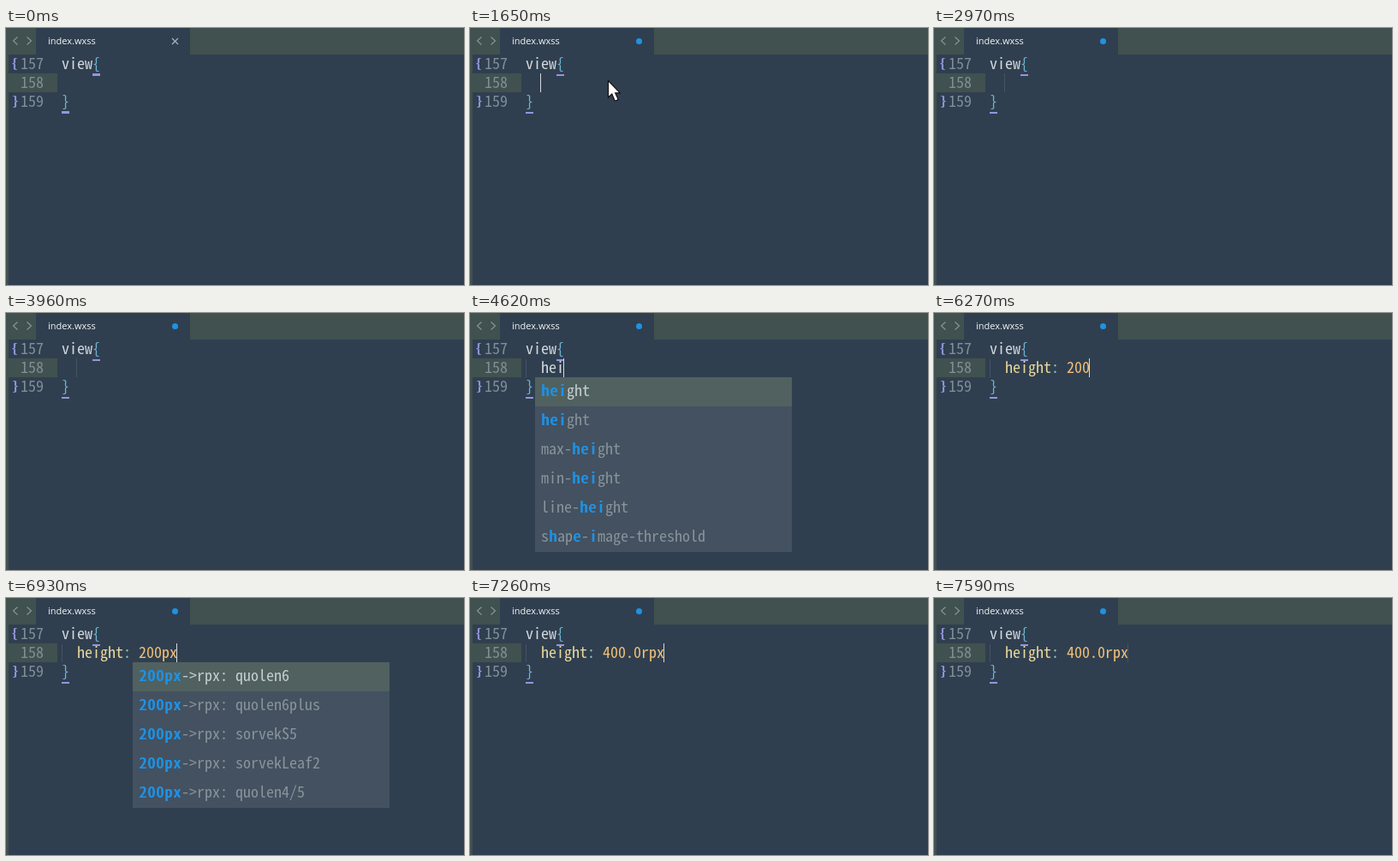
Recreate the animation shown at these times as an HTML page with a canvas. Size 535x300 px, loop 8 s.

```html
<!DOCTYPE html>
<html lang="en">
<head>
<meta charset="utf-8">
<title>Editor</title>
<style>
html, body { margin: 0; width: 100%; height: 100%; overflow: hidden; background: #303f4f; }
canvas { display: block; }
</style>
</head>
<body>
<canvas id="stage" width="535" height="300"></canvas>
<script>
const ctx = document.getElementById('stage').getContext('2d');
const LOOP = 8000, CELL = 9, LINE = 22, ROW = 34, LEFT = 65;
const MONO = '"Noto Sans Mono CJK SC", "Noto Sans Mono CJK JP", "Noto Sans Mono", monospace';
const C = {
  bg: '#303f4f', bar: '#40514f', text: '#d2d8de', number: '#7f8e97', brace: '#6db4d2',
  purple: '#9695dd', property: '#e8d99c', colon: '#8cc8c4', value: '#f3c076',
  popup: '#435160', chosen: '#506160', faint: '#88949a', picked: '#c6cecf',
  blue: '#1f92e4', nav: '#8a9795', caret: '#d4dade', dim: '#43535f'
};

// Pick the size whose advance is exactly one cell.
ctx.font = `100px ${MONO}`;
const SIZE = 100 * CELL / ctx.measureText('0').width;

// Square brackets mark the matched letters.
const properties = {
  x: 76,
  items: ['[hei]ght', '[hei]ght', 'max-[hei]ght', 'min-[hei]ght', 'line-[hei]ght', 's[h]ap[e]-[i]mage-threshold']
};
const units = {
  x: 148,
  items: ['quolen6', 'quolen6plus', 'sorvekS5', 'sorvekLeaf2', 'quolen4/5'].map(n => `[200px]->rpx: ${n}`)
};

const steps = [
  [0, { text: '', caret: 0, mouse: null, popup: null, dirty: false, underline: 3 }],
  [330, { mouse: [178, 77] }],
  [660, { mouse: [161, 61] }],
  [990, { caret: 1, underline: 2 }],
  [1650, { text: '  ', dirty: true }],
  [1980, { caret: 0 }],
  [2310, { caret: 1, mouse: null }],
  [2970, { caret: 0 }],
  [3630, { caret: 1 }],
  [3960, { caret: 0 }],
  [4620, { text: '  hei', caret: 1, popup: properties }],
  [4950, { caret: 0 }],
  [5280, { text: '  height: ', caret: 1, popup: null }],
  [5610, { caret: 0 }],
  [5940, { text: '  height: 20', caret: 1 }],
  [6270, { text: '  height: 200' }],
  [6600, { text: '  height: 200px', caret: 0, popup: units }],
  [6930, { caret: 1 }],
  [7260, { text: '  height: 400.0rpx', popup: null }],
  [7590, { caret: 0 }]
];

function stateAt(time) {
  return Object.assign({}, ...steps.filter(([at]) => at <= time).map(([, change]) => change));
}

function rect(color, x, y, w, h) {
  ctx.fillStyle = color;
  ctx.fillRect(x, y, w, h);
}

// Draws monospaced text and returns the x where it ends.
function write(str, x, y, color, size = SIZE) {
  ctx.font = `${size}px ${MONO}`;
  ctx.fillStyle = color;
  ctx.fillText(str, x, y);
  return x + str.length * CELL;
}

// Bold is the regular face struck twice, which widens every cell by a pixel.
function writeBold(str, x, y, color, size) {
  for (const char of str) {
    write(char, x, y, color, size);
    x = write(char, x + 1, y, color, size);
  }
  return x;
}

function stroke(color, width, ...lines) {
  ctx.strokeStyle = color;
  ctx.lineWidth = width;
  ctx.beginPath();
  for (const line of lines) line.forEach(([x, y], i) => i ? ctx.lineTo(x, y) : ctx.moveTo(x, y));
  ctx.stroke();
}

function drawTabs(dirty) {
  rect(C.bar, 0, 0, 535, 31);
  rect(C.bar, 0, 31, 3, 269);
  rect(C.bg, 35, 0, 180, 31);
  stroke(C.nav, 1.1, [[13.5, 10.5], [8.5, 15], [13.5, 19.5]], [[24.5, 10.5], [29.5, 15], [24.5, 19.5]]);
  ctx.font = '11px "Open Sans", "Noto Sans", sans-serif';
  ctx.fillStyle = '#f2f5f6';
  ctx.fillText('index.wxss', 49, 19);
  if (dirty) {
    ctx.fillStyle = C.blue;
    ctx.beginPath();
    ctx.arc(197.5, 15.5, 3.5, 0, Math.PI * 2);
    ctx.fill();
  } else {
    stroke('#a9b3ba', 1.2, [[194, 12], [201, 19]], [[201, 12], [194, 19]]);
  }
}

function drawCode(text, caret, underline) {
  rect(C.bar, 3, 53, 57, LINE);
  for (let i = 0; i < 3; i++) write(String(157 + i), 17, 48 + i * LINE, C.number);
  writeBold('{', 6, 46, C.purple, 14);
  writeBold('}', 7, 90, C.purple, 14);

  write('{', write('view', LEFT, 48, C.text), 48, C.brace);
  write('}', LEFT, 92, C.brace);
  rect(C.purple, 101, 56 - underline, 9, underline);
  rect(C.purple, LEFT, 100 - underline, 9, underline);

  if (text.trim()) rect(C.dim, LEFT, 54, 1, 21);
  const [name, value] = text.split(':');
  const end = write(name, LEFT, 70, value === undefined ? C.text : C.property);
  if (value !== undefined) write(value, write(':', end, 70, C.colon), 70, C.value);

  const x = LEFT - 1 + text.length * CELL;
  if (caret || text) rect(caret ? C.caret : C.dim, x, 53, 1, LINE);
}

function drawPopup({ x, items }) {
  rect(C.popup, x, 75, 300, items.length * ROW);
  rect(C.chosen, x, 75, 300, ROW);
  items.forEach((item, row) => {
    const y = 97 + row * ROW;
    let pen = x + 7;
    item.split(/[\[\]]/).forEach((part, i) => {
      pen = i % 2 ? writeBold(part, pen, y, C.blue) : write(part, pen, y, row ? C.faint : C.picked);
    });
  });
}

function drawMouse([x, y]) {
  const outline = [[.5, .5], [.5, 20], [4.8, 16], [8.3, 24.3], [12.2, 22.6], [8.7, 14.8], [14.3, 14.8]];
  ctx.beginPath();
  outline.forEach(([dx, dy]) => ctx.lineTo(x + dx, y + dy));
  ctx.closePath();
  ctx.fillStyle = '#fff';
  ctx.fill();
  ctx.strokeStyle = '#111';
  ctx.lineWidth = 1.2;
  ctx.stroke();
}

const start = performance.now();

function draw() {
  const { text, caret, mouse, popup, dirty, underline } = stateAt((performance.now() - start) % LOOP);
  rect(C.bg, 0, 0, 535, 300);
  drawTabs(dirty);
  drawCode(text, caret, underline);
  if (popup) drawPopup(popup);
  if (mouse) drawMouse(mouse);
  requestAnimationFrame(draw);
}
draw();
</script>
</body>
</html>
```
